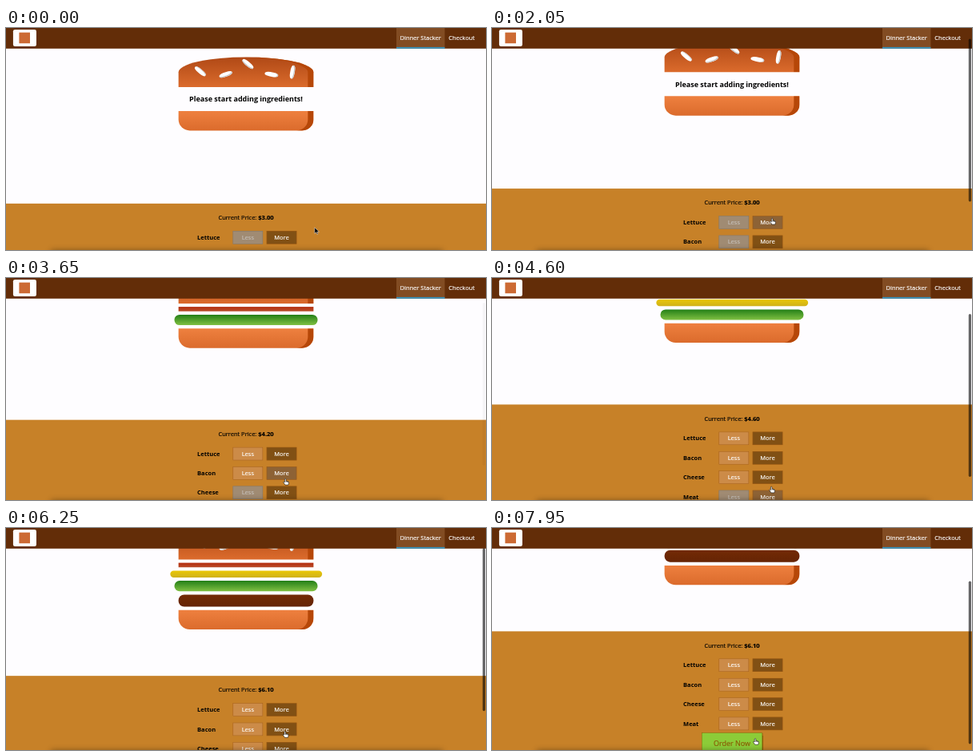
An HTML page that plays this animation: 600x278 px, repeating every 8000 ms.

```html
<!DOCTYPE html>
<html lang="en">
<head>
<meta charset="utf-8">
<title>Sandwich order page</title>
<style>
  html, body { margin: 0; width: 100%; height: 100%; overflow: hidden; background: #fefdff; }
  /* The page is laid out 1280 wide and shown at 600. */
  #stage {
    position: absolute; width: 1280px; height: 594px; overflow: hidden;
    transform: scale(.46875); transform-origin: 0 0;
    font: 16px/22px "Open Sans", sans-serif; color: #000; -webkit-text-stroke: .35px;
  }
  #stage * { box-sizing: border-box; }

  #toolbar { position: absolute; top: -1px; width: 100%; height: 56px; background: #632d08; color: #fff; }
  #logo { position: absolute; left: 19px; top: 5px; width: 62px; height: 45px; border-radius: 5px; background: #fff; }
  #logo::after { content: ""; position: absolute; left: 16px; top: 8px; width: 29px; height: 29px; background: #cc6a33; }
  nav { position: absolute; right: 20px; height: 100%; display: flex; }
  nav span { padding: 15px 10px; height: 100%; }
  nav .active { background: #824c23; border-bottom: 4px solid #3a96c0; }

  #page { position: absolute; width: 100%; }
  #burger { position: absolute; left: 415px; top: 69px; width: 450px; height: 400px; }
  #burger > div { margin: 9px auto; }
  .top, .bottom { width: 80%; box-shadow: inset -15px 0 #b64708; }
  .top { position: relative; height: 20%; border-radius: 50% 50% 0 0; background: linear-gradient(#b04916, #db6b2c); }
  .bottom { height: 13%; border-radius: 0 0 30px 30px; background: linear-gradient(#ee803f, #db6b2c); }
  .bacon { width: 80%; height: 3%; background: linear-gradient(#b42c0c, #b94f2c); }
  .cheese { width: 90%; height: 4.5%; border-radius: 20px; background: linear-gradient(#eac704, #d0b21c); }
  .lettuce { width: 85%; height: 7%; border-radius: 20px; background: linear-gradient(#237f17, #80c042); }
  .meat { width: 80%; height: 8%; border-radius: 15px; background: linear-gradient(#732a05, #652404); }
  #message { margin: 1em 0; font: bold 19.2px/26px "Open Sans", sans-serif; text-align: center; -webkit-text-stroke: 0; }

  .seed, .seed::before, .seed::after { position: absolute; border-radius: 40%; background: #fff; }
  .seed { width: 10%; height: 15%; top: 50%; }
  .seed::before, .seed::after { width: 100%; height: 100%; }
  .left { left: 30%; transform: rotate(-20deg); box-shadow: inset -2px -3px #c9c9c9; }
  .left::after { content: ""; left: -170%; top: -260%; transform: rotate(60deg); box-shadow: inset -1px 2px #c9c9c9; }
  .left::before { content: ""; left: 180%; top: -50%; transform: rotate(60deg); box-shadow: inset -1px -3px #c9c9c9; }
  .right { left: 64%; transform: rotate(10deg); box-shadow: inset -3px 0 #c9c9c9; }
  .right::before { content: ""; left: 150%; top: -130%; transform: rotate(90deg); box-shadow: inset 1px 3px #c9c9c9; }

  #panel { position: absolute; top: 469px; width: 100%; height: 350px; background: #c78128; }
  #price { position: absolute; top: 26px; width: 100%; text-align: center; }
  .row { position: absolute; left: 510px; height: 35px; line-height: 35px; font-weight: bold; -webkit-text-stroke: 0; }
  .button { position: absolute; top: 0; width: 80px; height: 35px; border: 1px solid #9f5a12;
            font-weight: normal; line-height: 33px; text-align: center; color: #fff; -webkit-text-stroke: .35px; }
  .less { left: 95px; background: #cc8b48; }
  .less.disabled { background: #a08b73; border-color: #7e7365; color: #c5c0ba; }
  .more { left: 185px; background: #815014; }
  .more.hover { background: #8d6235; }
  #order { position: absolute; left: 559px; top: 271px; width: 162px; height: 58px; border: 1px solid #8a5b06;
           background: #d0cf2a; color: #8a5b06; box-shadow: 2px 2px 2px #8a5b06;
           font-size: 19.2px; line-height: 56px; text-align: center; }
  #order.hover { background: #8ccc38; }

  #shade { position: absolute; left: 120px; right: 116px; top: 594px; height: 20px; box-shadow: 0 0 16px #0006; }
  #thumb { position: absolute; left: 1271px; width: 7px; height: 435px; border-radius: 4px; background: #0009; }
  #cursor { position: absolute; left: 0; top: 0; overflow: visible; }
</style>
</head>
<body>
<div id="stage">
  <div id="page">
    <div id="burger">
      <div class="top"><i class="seed left"></i><i class="seed right"></i></div>
      <p id="message">Please start adding ingredients!</p>
      <div class="bacon"></div>
      <div class="cheese"></div>
      <div class="lettuce"></div>
      <div class="meat"></div>
      <div class="bottom"></div>
    </div>
    <div id="panel">
      <div id="price">Current Price: <b></b></div>
      <div id="order">Order Now</div>
    </div>
  </div>
  <div id="toolbar">
    <div id="logo"></div>
    <nav><span class="active">Dinner Stacker</span><span>Checkout</span></nav>
  </div>
  <div id="shade"></div>
  <div id="thumb"></div>
  <svg id="cursor" width="1" height="1" stroke-linejoin="round">
    <path id="arrow" d="M0 0V16L4 12.5L6.5 18L9 17L6.5 11.5H12Z" fill="#000" stroke="#fff"/>
    <path id="hand" transform="scale(.88)" d="M-2 1.5Q0-1 2 1.5V7L9 9Q11 10 10.5 13L9 19H-1L-6 11Q-6 8.5-3.5 9.5L-2 11ZM2 7V11M5 8V11M8 9V12" fill="#fff" stroke="#000" stroke-width="1.3"/>
  </svg>
</div>
<script>
const LOOP = 8000, SCROLL_TIME = 470, GLIDE_TIME = 300, THUMB_HOLD = 480, THUMB_FADE = 150;
const $ = selector => document.querySelector(selector);

// Each ingredient with its price and the time it is clicked.
const items = [
  { name: 'Lettuce', cost: 0.5, click: 2350 },
  { name: 'Bacon', cost: 0.7, click: 3350 },
  { name: 'Cheese', cost: 0.4, click: 4000 },
  { name: 'Meat', cost: 1.5, click: 5500 },
];

const scrolls = [
  { at: 1100, y: 40 },
  { at: 2560, y: 90 },
  { at: 4350, y: 164 },
  { at: 6000, y: 0 },
  { at: 7200, y: 193 },
];

// Where the pointer heads, and the button it then hovers.
const start = { x: 823, y: 533 };
const glides = [
  { at: 1650, x: 747, y: 508, over: 'Lettuce' },
  { at: 3050, x: 745, y: 536, over: 'Bacon' },
  { at: 3700, x: 745, y: 566, over: 'Cheese' },
  { at: 4450, x: 745, y: 548, over: 'Meat' },
  { at: 5900, x: 744, y: 543 },
  { at: 7620, x: 702, y: 562, over: 'Order' },
];

const clamp = u => Math.min(1, Math.max(0, u));
const ease = u => u * u * (3 - 2 * u);

function follow(moves, axis, value, duration, t) {
  for (const move of moves) value += (move[axis] - value) * ease(clamp((t - move.at) / duration));
  return value;
}

// The scrollbar shows while the page scrolls and fades a little later.
function thumbOpacity(t) {
  const last = scrolls.findLast(({ at }) => at <= t);
  return last ? 1 - clamp((t - last.at - SCROLL_TIME - THUMB_HOLD) / THUMB_FADE) : 0;
}

items.forEach((item, i) => {
  const row = document.createElement('div');
  row.className = 'row';
  row.style.top = 72.5 + 52 * i + 'px';
  row.innerHTML = `${item.name}<span class="button less">Less</span><span class="button more">More</span>`;
  $('#panel').append(row);
  item.less = row.querySelector('.less');
  item.more = row.querySelector('.more');
  item.layer = $('.' + item.name.toLowerCase());
});

function draw(t) {
  const arrived = glides.findLast(({ at }) => at + GLIDE_TIME / 2 <= t);
  const hover = arrived?.over;
  let price = 3;
  for (const item of items) {
    const added = t >= item.click;
    if (added) price += item.cost;
    item.layer.style.display = added ? '' : 'none';
    item.less.classList.toggle('disabled', !added);
    item.more.classList.toggle('hover', hover === item.name);
  }
  $('#message').style.display = price > 3 ? 'none' : '';
  $('#price b').textContent = '$' + price.toFixed(2);
  $('#order').classList.toggle('hover', hover === 'Order');

  const scroll = follow(scrolls, 'y', 0, SCROLL_TIME, t);
  $('#page').style.top = -scroll + 'px';
  $('#thumb').style.top = scroll * 0.735 + 'px';
  $('#thumb').style.opacity = thumbOpacity(t);

  $('#hand').style.display = arrived ? '' : 'none';
  $('#arrow').style.display = arrived ? 'none' : '';
  const x = follow(glides, 'x', start.x, GLIDE_TIME, t);
  const y = follow(glides, 'y', start.y, GLIDE_TIME, t);
  $('#cursor').style.transform = `translate(${x}px, ${y}px)`;
}

function tick() {
  draw(performance.now() % LOOP);
  requestAnimationFrame(tick);
}
tick();
</script>
</body>
</html>
```
